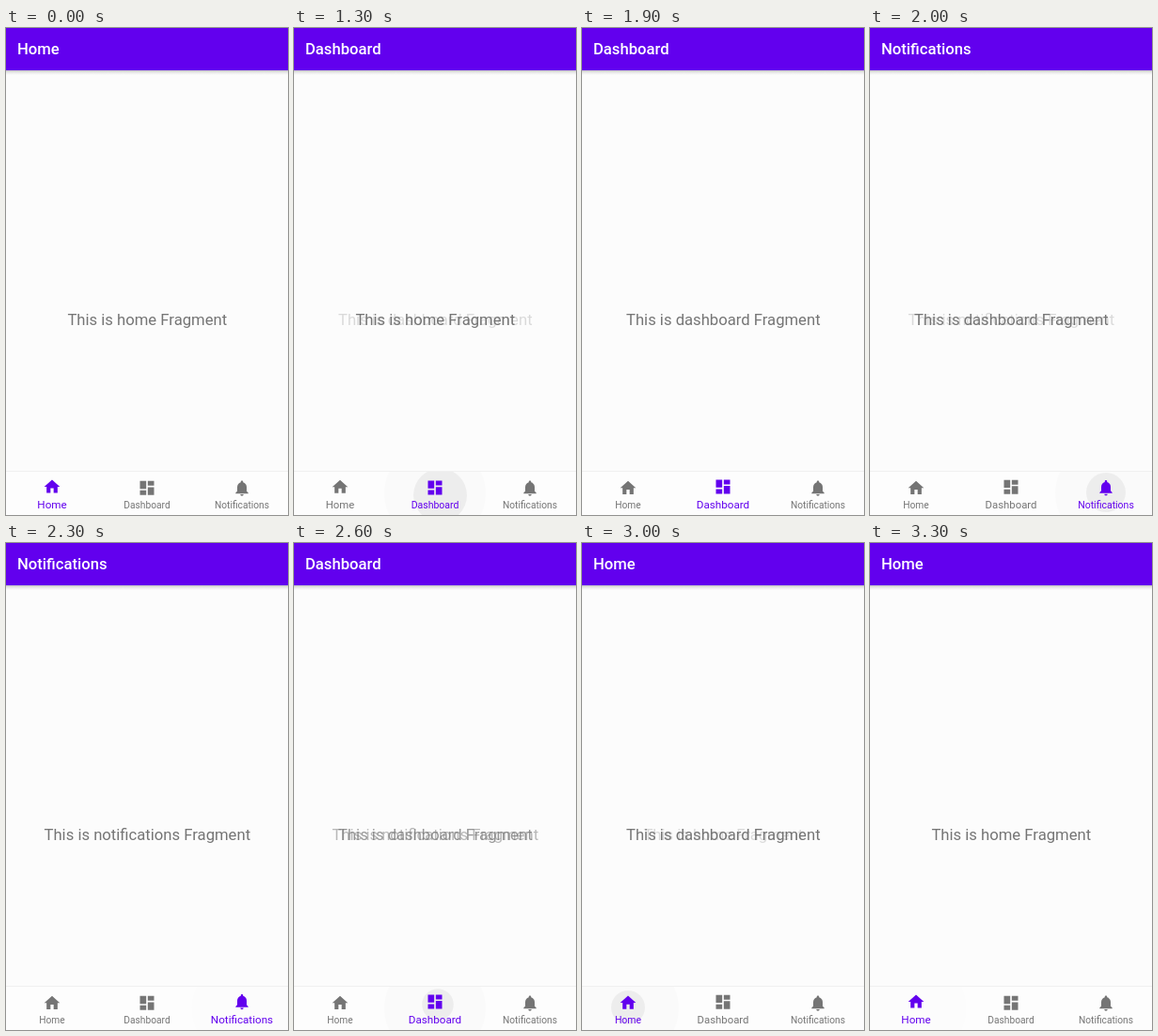
Animation of 300 by 518 pixels, one loop 3500 ms. Source, as an HTML page:

```html
<!DOCTYPE html>
<html lang="en">
<head>
<meta charset="utf-8">
<title>Bottom navigation</title>
<style>
  html, body { margin: 0; width: 100%; height: 100%; overflow: hidden; background: #fcfcfc; }
  svg { display: block; width: 300px; height: 518px; font-family: Roboto, sans-serif; }
  .body { font-size: 16.67px; fill: #757575; text-anchor: middle; }
  .label { text-anchor: middle; }
  #title { font-size: 16.67px; font-weight: 500; fill: #fff; }
</style>
</head>
<body>
<svg viewBox="0 0 300 518">
  <defs>
    <linearGradient id="shade" x2="0" y2="1">
      <stop offset="0" stop-opacity=".22"/>
      <stop offset=".5" stop-opacity=".07"/>
      <stop offset="1" stop-opacity="0"/>
    </linearGradient>
    <clipPath id="bar"><rect y="472" width="300" height="46"/></clipPath>
  </defs>
  <rect width="300" height="518" fill="#fcfcfc"/>
  <rect y="45" width="300" height="5" fill="url(#shade)"/>
  <rect width="300" height="45" fill="#6200ee"/>
  <text id="title" x="11.9" y="28"></text>
  <rect y="471" width="300" height="1" fill="#f0f0f0"/>
  <rect y="472" width="300" height="46" fill="#fdfdfd"/>
  <g clip-path="url(#bar)">
    <circle id="glow" cy="495" r="54"/>
    <circle id="ripple"/>
  </g>
  <g id="tabs"></g>
</svg>
<script>
const LOOP = 3500, STEP = 100;
const ACTIVE = '#6200ee', IDLE = '#757575';
const get = id => document.getElementById(id);
const clamp = v => Math.max(0, Math.min(1, v));

const tabs = [
  { name: 'Home', x: 49, icon: 'M10 20v-6h4v6h5v-8h3L12 3 2 12h3v8z' },
  { name: 'Dashboard', x: 150, icon: 'M3 13h8V3H3zM3 21h8v-6H3zM13 21h8V11h-8zM13 3v6h8V3z' },
  { name: 'Notifications', x: 251, icon: 'M12 22c1.1 0 2-.9 2-2h-4c0 1.1.9 2 2 2zm6-6v-5c0-3.07-1.64-5.64-4.5-6.32V4c0-.83-.67-1.5-1.5-1.5s-1.5.67-1.5 1.5v.68C7.63 5.36 6 7.92 6 11v5l-2 2v1h16v-1z' }
];

// Each tap: time, tab left, tab opened, ripple offset from the tab, ripple y and first radius
const taps = [
  { at: -1000, from: 1, to: 0, dx: 0, y: 491, r: 6 },
  { at: 1250, from: 0, to: 1, dx: 5.5, y: 497, r: 22.5 },
  { at: 1950, from: 1, to: 2, dx: 0, y: 494, r: 15 },
  { at: 2510, from: 2, to: 1, dx: 3, y: 491, r: 6 },
  { at: 2950, from: 1, to: 0, dx: 0, y: 494, r: 12 }
];

function add(tag, attrs, text = '') {
  const el = document.createElementNS('http://www.w3.org/2000/svg', tag);
  set(el, attrs);
  el.textContent = text;
  return get('tabs').appendChild(el);
}

function set(el, attrs) {
  for (const key in attrs) el.setAttribute(key, attrs[key]);
}

for (const tab of tabs) {
  tab.body = add('text', { class: 'body', x: 150.3, y: 316 }, `This is ${tab.name.toLowerCase()} Fragment`);
  tab.path = add('path', { d: tab.icon });
  tab.label = add('text', { class: 'label', x: tab.x, y: 511 }, tab.name);
}

function draw(time) {
  const tap = taps.findLast(t => t.at <= time);
  const age = time - tap.at;
  const grow = clamp((age - 40) / 50);
  const fadeIn = clamp((age - 30) / 80);
  const fadeOut = clamp((130 - age) / 80);

  tabs.forEach((tab, i) => {
    const opened = i === tap.to, left = i === tap.from;
    const size = opened ? grow : left ? 1 - grow : 0;
    const fill = opened ? ACTIVE : IDLE;
    set(tab.body, { opacity: opened ? fadeIn : left ? fadeOut : 0 });
    set(tab.path, { fill, transform: `translate(${tab.x - 10} ${479.3 - 1.4 * size}) scale(.8333)` });
    set(tab.label, { fill, 'font-size': 10.2 + 1.47 * size });
  });

  const { name, x } = tabs[tap.to];
  get('title').textContent = name;
  set(get('glow'), { cx: x, opacity: 0.012 * clamp((450 - age) / 250) });
  set(get('ripple'), {
    cx: x + tap.dx, cy: tap.y, r: tap.r + 0.12 * age,
    opacity: 0.05 * clamp((250 - age) / 150)
  });
}

let start;
function tick(now) {
  start ??= now;
  draw(Math.floor((now - start) % LOOP / STEP) * STEP);
  requestAnimationFrame(tick);
}
draw(0);
requestAnimationFrame(tick);
</script>
</body>
</html>
```
